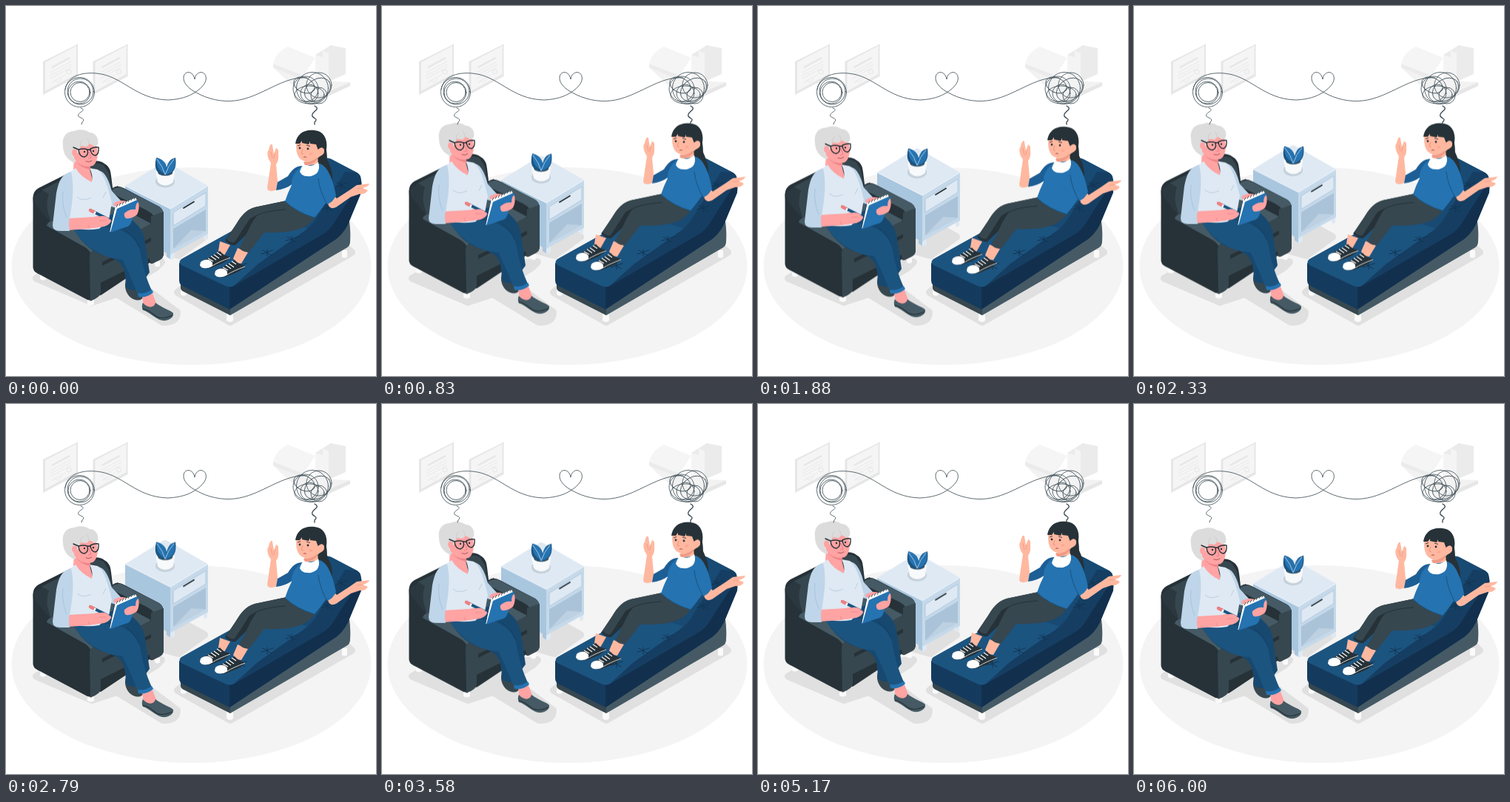
Write an HTML page that moves like this. It is 500 px wide and 500 px high and loops after 6.04 s.

```html
<!DOCTYPE html>
<html lang="en">
<head>
<meta charset="utf-8">
<title>Talking it through</title>
<style>
html, body { margin: 0; width: 100%; height: 100%; overflow: hidden; background: #fff; }
svg { display: block; width: 100vw; height: 100vh; }
@keyframes rise { to { transform: translateY(var(--lift)); } }
.bob, .float { animation: rise 755ms cubic-bezier(.37, 0, .63, 1) infinite alternate; }
.bob { --lift: -9.6px; }
.float { animation-duration: 3020ms; animation-timing-function: linear; }
.desk { --lift: -29px; }
.plant { --lift: -20px; }
.line { fill: none; stroke: #37474f; stroke-linecap: round; stroke-linejoin: round; }
.shade { fill: #e0e0e0; stroke: #e0e0e0; stroke-width: 10; stroke-linejoin: round; }
.ink { fill: #263238; }
.slate { fill: #37474f; }
.steel { fill: #455a64; }
.pale { fill: #dfe9f3; }
.mist { fill: #bfd5e9; }
.blue { fill: #2573b1; }
.navy { fill: #1c5480; }
.deep { fill: #143b5e; }
.rose { fill: #ffa3a3; }
.peach { fill: #ffb8a0; }
.white { fill: #fff; }
.thin { stroke-width: .8; }
</style>
</head>
<body>
<svg viewBox="0 0 500 500">
<defs>
  <g id="diploma">
    <path d="M50 75 94 53 97 51V95L50 120Z" fill="#e6e6e6"/>
    <path d="M53 76 95 54V92L53 115Z" fill="#f5f5f5"/>
    <g fill="none" stroke="#e6e6e6">
      <path d="M62 83 86 70" stroke-width="2.200"/>
      <path d="M60 90 88 75M60 94 88 79M60 98 88 83M64 102 80 93" stroke-width=".8"/>
      <path d="M62 104q4-5 6-2t7-4" stroke-width=".8"/>
      <circle cx="85" cy="89" r="3"/>
    </g>
  </g>
  <path id="tuft" d="M-8 2Q-2 1 0 0Q3-2 8-3M-6-3Q-1-1 0 0Q2 2 6 4M0-4V5" fill="none" stroke="#123452" stroke-width="1" stroke-linecap="round"/>
  <g id="sneaker">
    <path class="ink" d="M289 331C294 337 299 338 303 339 298 347 288 349 277 354 266 356 261 351 263 347 271 341 282 337 289 331Z"/>
    <path class="white" d="M263 346C269 341 276 342 279 347L279 351C272 356 263 355 262 350Z"/>
    <path d="M273 341 280 345M277 338 284 343M281 336 288 341M285 333 291 337" fill="none" stroke="#fff" stroke-width="1.200"/>
    <path d="M264 352Q271 356 279 351T303 340" fill="none" stroke="#fff" stroke-width=".8"/>
  </g>
</defs>

<!-- wall -->
<use href="#diploma"/>
<use href="#diploma" x="67.5"/>
<path d="M361 78 405 100 465 103V108L413 132 361 83Z" fill="#f2f2f2"/>
<path d="M465 103V108L413 132V126Z" fill="#e6e6e6"/>
<path d="M361 78Q365 62 381 55L418 70 402 94Z" fill="#f5f5f5"/>
<path d="M361 78 402 94V100L361 83Z" fill="#ebebeb"/>
<path d="M418 66 439 53 459 57V92L418 110Z" fill="#ebebeb"/>
<path d="M418 66 428 69V109L418 110ZM428 60 436 64V103L428 106Z" fill="#f4f4f4"/>

<!-- floor -->
<ellipse cx="250.500" cy="351.500" rx="243" ry="133.500" fill="#f4f4f4"/>
<path class="shade" d="M41 368 70 353 160 350 210 346 203 353 174 371 231 414Q231 427 212 427L150 389 116 400Z"/>
<path class="shade" d="M190 325 230 291 268 312 233 337Z"/>
<path class="shade" d="M232 387 250 372 450 318 467 333 303 427Z"/>

<!-- cabinet -->
<g class="float desk">
  <path class="pale" d="M267 304H272V315Q269 318 267 315ZM222 330H228V340Q225 344 222 342Z"/>
  <path d="M161 243 222 274V342L217 339V334L161 306Z" fill="#a9c6df"/>
  <path d="M222 274 273 243V308L222 336Z" fill="#c5d9ea"/>
  <path class="pale" d="M161 243 213 211Q215 210 217 211L273 243 222 274Z"/>
  <path d="M161 243 222 274 273 243" fill="none" stroke="#edf3f8"/>
  <path d="M226 279 270 252V270L226 297Z" fill="#dfe9f3" stroke="#a9c3da" stroke-width=".8"/>
  <path d="M240 273 254 264.500" stroke="#263238" stroke-width="1.800" stroke-linecap="round"/>
  <path d="M226 301 270 275V304L226 328Z" fill="#aac3d8"/>
  <path d="M226 328 250 303 270 304Z" fill="#bdd1e2"/>
</g>
<g class="float plant">
  <ellipse cx="215" cy="237" rx="13" ry="8.500" fill="#c3cfda"/>
  <path d="M202.500 225H228L226 238Q215 247 205 238Z" fill="#f7f9fa"/>
  <ellipse cx="215.300" cy="225" rx="12.700" ry="5.500" fill="#fff"/>
  <ellipse cx="215.300" cy="225.500" rx="10" ry="4" fill="#455a64"/>
  <path class="navy" d="M214 229C202 227 200 217 203 205 212 207 218 213 217 222 218 212 221 207 229 205 231 218 227 228 214 229Z"/>
  <path class="blue" d="M214 226C206 223 203 215 203 205 213 207 218 213 216 227ZM216 228C216 216 220 208 228 206 230 216 227 225 216 228Z"/>
  <path d="M204 207Q212 217 215 228Q219 216 227 207" fill="none" stroke="#dfe9f3" stroke-width=".7"/>
</g>

<!-- listener and armchair -->
<g class="bob">
  <path d="M46 360h8v9q-4 3-8 0ZM110 394h9v9q-4 3-9 0ZM201 345h7v6q-3 3-7 0Z" fill="#fafafa"/>
  <path class="ink" d="M36.500 258Q37 250 44 246L112 212Q121 207 130 211L136 215Q141 219 142 229L146 262 150 243 210 275 197 345 128 391 42 361Z"/>
  <path class="slate" d="M48 249 114 215Q123 210 132 215L139 226 147 270 92 300 60 291Z"/>
  <path d="M37 257 49 249 58 254Q52 270 60 291L44 298Z" fill="#2b383f"/>
  <path class="ink" d="M140 254Q140 247 148 244 153 243 159 246L207 271Q213 275 213 283V335Q213 340 208 343L198 348Q193 349 193 342L192 300 142 274Z"/>
  <path class="steel" d="M141 251Q146 244 155 245L207 271Q212 274 213 281L200 284Q196 279 190 276L145 254Z"/>
  <path class="slate" d="M196 284 213 278V335Q213 340 208 343L198 348Q194 347 194 340Z"/>
  <path class="slate" d="M92 300 150 270 196 296V340L128 374Z"/>
  <path class="steel" d="M92 295 147 268 196 294 130 329Z"/>
  <path class="ink" d="M130 346 196 313V318L130 351Z"/>
  <path class="ink" d="M36.500 258 40 268 58 290 120 322Q128 328 128 335V386Q128 391 120 396 115 399 110 397L42 361Q36.500 358 36.500 353Z"/>
  <path class="steel" d="M55 297Q56 290 67 290L122 319Q127 322 128 329L115 335Q111 328 105 325Z"/>
  <path class="slate" d="M113 337Q114 329 128 326V386Q128 391 123 394L114 399Z"/>

  <path class="slate" d="M163 369C158 379 163 392 172 396 180 400 187 396 185 390L177 372Z"/>
  <path d="M101 300 147 280C170 284 183 298 187 313L194 360 176 384Q168 385 162 380C162 350 155 343 132 337 113 331 100 316 92 302Z" fill="#174970"/>
  <path class="rose" d="M184 391 197 386 204 404Q197 411 186 405Z"/>
  <path class="navy" d="M90 299H134C155 299 176 311 181 330 185 354 190 369 198 387Q190 394 179 392C171 372 163 353 157 342 132 343 102 322 90 299Z"/>
  <path d="M178 388Q189 390 197 383L199 387Q190 395 179 393Z" fill="#2573b1"/>
  <path d="M162 304Q174 311 180 326" class="line" style="stroke:#123f63"/>
  <path class="steel" d="M185 401C191 408 200 409 202 401 211 408 222 411 226 415 227 421 220 426 211 425 202 423 193 413 185 411 183 407 184 403 185 401Z"/>
  <path d="M185 409Q193 411 201 418T225 418" fill="none" stroke="#263238" stroke-width="1.200"/>

  <path class="mist" d="M124 222C134 223 139 236 143 250L156 264 149 273 132 268Z"/>
  <path class="rose" d="M145 267Q153 261 163 264L158 276 148 275Z"/>
  <path class="rose" d="M92 203H113V220L118 240 99 231 91 222Z"/>
  <path class="pale" d="M86 225 94 219Q101 231 116 238 118 229 113 219L124 221C133 228 138 245 143 266L139 289 126 301Q103 305 84 297L82 245Z"/>
  <path d="M96 258Q104 265 115 259M135 251l-4 8" fill="none" stroke="#bacfe1"/>
  <path class="rose" d="M84 287 119 285Q126 282 134 285L142 289Q142 295 133 298L112 301 84 303Z"/>
  <path class="mist" d="M88 224C75 227 71 237 68 253L63 296Q63 304 73 304H86Q84 294 86 287C91 260 92 241 88 224Z"/>
  <path d="M77 251Q75 270 82 286" fill="none" stroke="#a4c0d9" stroke-width=".8"/>
  <path d="M114 276 138 288" stroke="#1c5480" stroke-width="4" stroke-linecap="round"/>
  <path d="M114 276 119 278.500" stroke="#ef7f80" stroke-width="4.300" stroke-linecap="round"/>
  <path d="M119 279 121 280" stroke="#fff" stroke-width="4"/>
  <path class="rose" d="M120 287Q130 281 138 286L142 291Q137 297 127 296Z"/>
  <path d="M111 296l2 4M126 290l9 0" stroke="#e9868b" stroke-width=".8"/>
  <path class="white" d="M147 271 175 259 178 264 165 297 140 305Z"/>
  <path class="blue" d="M150 274 177 262Q179 262 178 266L169 293Q167 298 161 299L141 306Z"/>
  <path d="M147 272 140 304" stroke="#174970"/>
  <path d="M149 272l2-4M153 270l2-4M157 268.500l2-4M161 267l2-4M165 265l2-4M169 263l2-4M173 261.500l2-4" stroke="#37474f" stroke-width=".9"/>
  <path class="rose" d="M160 280Q167 274 175 275 175 266 179 265 181 275 177 282 170 288 162 287Q159 284 160 280Z"/>

  <path class="rose" d="M93 188 120 184C126 195 125 211 117 216 106 220 93 213 91 201Z"/>
  <path d="M93 208Q101 218 114 217L114 221Q101 219 93 208Z" fill="#ed858b"/>
  <path d="M92 212C84 208 77 201 77 189 75 177 82 169 92 169 99 166 108 167 113 171 121 171 126 179 124 187L120 190 113 186 109 190 101 189 97 199Q91 194 90 201Q92 207 95 210Z" fill="#dcdcdc"/>
  <path d="M101 190Q99 184 104 181M112 186Q112 181 109 179" fill="none" stroke="#c8c8c8" stroke-width=".7"/>
  <path class="rose" d="M96 195Q90 191 89 198 90 205 96 205Z"/>
  <g class="line" style="stroke:#263238">
    <path d="M91 191 98 194M98 194Q105 192 110 194 112 202 106 204 99 204 98 194ZM114 193Q120 190 125 191 126 200 121 202 115 202 114 193ZM110 195Q112 193 114 195" stroke-width="1.400"/>
    <path d="M108 210Q112 212 116 209" stroke="#a24e59" stroke-width=".9"/>
  </g>
  <circle class="ink" cx="106" cy="197" r="1.200"/>
  <circle class="ink" cx="118" cy="196" r="1.200"/>
  <path d="M112 197 115 205 111 206" fill="none" stroke="#e77c82" stroke-width=".9"/>
</g>

<!-- couch -->
<path d="M236 382h8v8q-4 3-8 0ZM298 415h9v10q-4 4-9 0ZM454 330h7v9q-3 3-7 0Z" fill="#fafafa"/>
<path class="slate" d="M236 370 303 402V418L240 386Q236 384 236 381Z"/>
<path class="steel" d="M303 401 436 305 464 291Q466 306 465 319 465 324 460 327L303 418Z"/>
<path class="deep" d="M234 347 302 379 428 309Q438 303 443 292L478 230Q482 236 480 252L465 288Q459 305 446 315L302 410 238 378Q234 376 234 370Z"/>
<path d="M302 378V410L446 315Q459 305 465 288L480 252 479 232Z" fill="#12304e"/>
<path class="navy" d="M237 342 289 313 380 263Q390 256 397 245L421 211Q430 202 440 207L474 225Q482 230 478 238L444 291Q438 302 428 308L308 378Q303 381 296 378L237 350Q232 346 237 342Z"/>
<path d="M385 293 437 206 474 225Q482 230 478 238L444 291Q438 302 428 308Z" fill="#184a73"/>
<path d="M308 378 340 349 402 305Q413 297 420 286L458 224 474 225Q482 230 478 238L444 291Q438 302 428 308Z" fill="#153e62"/>
<use href="#tuft" x="317" y="351"/>
<use href="#tuft" x="353" y="333"/>
<use href="#tuft" x="386" y="315"/>
<use href="#tuft" x="434" y="273"/>
<use href="#tuft" x="453" y="242"/>

<!-- speaker -->
<g class="bob">
  <path class="ink" d="M418 180C433 181 434 197 434 207 438 216 443 228 440 237 431 233 422 220 419 206Z"/>
  <path class="peach" d="M353 246 358 212C353 206 352 196 355 195 356 188 359 185 360 188L362 200 365 192Q369 193 368 200 369 209 365 214L368 247Q360 252 354 249Z"/>
  <path d="M358 197l2 9M363 199l-1 7" stroke="#ee9a86" stroke-width=".8"/>
  <path d="M401 216C391 216 386 222 381 230L367 238 365 249Q377 248 388 240Z" fill="#1d5e95"/>

  <path class="peach" d="M289 318 303 323 295 337Q290 337 287 331Z"/>
  <path class="ink" d="M379 263 336 272C323 276 318 284 311 295L296 317Q303 324 310 323L335 299 390 283Z"/>
  <path class="peach" d="M313 327 327 333 318 348Q310 348 307 341Z"/>
  <path class="slate" d="M378 264C366 268 346 274 337 286 330 295 325 310 315 327Q321 334 329 332L349 306C373 307 398 305 411 293 418 286 419 282 417 277Z"/>
  <path class="slate" d="M379 263 336 272C323 276 318 284 311 295L298 315Q304 321 309 319L329 288Q343 279 374 276Z"/>
  <path d="M329 290Q341 277 378 275" fill="none" stroke="#263238"/>
  <use href="#sneaker"/>
  <use href="#sneaker" x="20" y="12"/>

  <path class="peach" d="M404 203 421 198 422 220Q413 228 402 221Z"/>
  <path class="blue" d="M399 217 424 213C437 218 441 235 441 254L425 276 417 286Q393 279 377 264 381 252 386 242 385 228 399 217Z"/>
  <path d="M377 264Q393 279 417 286" fill="none" stroke="#1c5480"/>
  <path class="peach" d="M434 262 443 256 447 260 464 249 474 242 491 240Q490 244 482 246L489 249Q486 255 478 254L466 258 446 272Q439 275 436 270Z"/>
  <path class="blue" d="M423 216C436 216 442 237 446 256Q442 265 434 268 422 251 420 235Z"/>
  <path d="M422 233Q424 251 434 268" fill="none" stroke="#1c5480"/>
  <path d="M474 247l8-1" stroke="#ee9a86" stroke-width=".8"/>
  <path class="white" d="M403 213Q411 220 422 211 425 220 420 226 414 231 407 230 400 230 397 224Q399 217 403 213Z"/>
  <path class="peach" d="M393 181 424 182C430 189 430 201 423 204 416 212 405 212 398 207 392 202 391 190 393 181Z"/>
  <path d="M402 211Q413 212 421 204L421 207Q414 216 404 215Z" fill="#ee9a86"/>
  <path class="ink" d="M391 186C393 172 404 166 417 168 430 169 435 181 433 193L432 208Q425 203 422 195L419 187 411 186 411 183 409 187 400 185 400 182 397 186Z"/>
  <path class="peach" d="M421 195Q427 188 430 194 431 202 423 203Z"/>
  <circle class="ink" cx="397" cy="192" r="1.400"/>
  <circle class="ink" cx="408" cy="193" r="1.400"/>
  <path d="M394 189 398 187.500M406 188 411 189.500" stroke="#263238" stroke-width=".9"/>
  <path d="M401 193 399 199 402 200" fill="none" stroke="#e88879" stroke-width=".8"/>
  <path d="M402 204.500Q404 203 406 204.500" fill="none" stroke="#a24e59" stroke-width="1"/>
  <ellipse cx="412" cy="200" rx="2.500" ry="1.800" fill="#ffa793"/>
</g>

<!-- thread -->
<g class="line thin">
  <circle cx="99.500" cy="116.500" r="20"/>
  <circle cx="100.500" cy="115.500" r="17.500"/>
  <circle cx="99" cy="117" r="15"/>
  <circle cx="100" cy="116.500" r="13"/>
  <path d="M80 113C82 96 100 89 122 91 158 94 174 126 219 127 237 126 247 122 255 117 266 110 272 102 270 95 267 86 256 89 255 99 253 87 241 87 240 96 239 105 249 113 257 117 273 126 292 130 309 128 345 124 374 94 407 97"/>
  <path d="M101 138C111 141 95 144 98 149 101 152 108 152 103 157L102 160"/>
</g>
<g class="line thin">
  <circle cx="414" cy="111" r="21.500"/>
  <circle cx="405" cy="112" r="17"/>
  <circle cx="423" cy="107" r="17"/>
  <ellipse cx="410" cy="120" rx="20" ry="12"/>
  <ellipse cx="421" cy="113" rx="19" ry="14" transform="rotate(-35 421 113)"/>
  <ellipse cx="403" cy="107" rx="15" ry="10" transform="rotate(25 403 107)"/>
  <circle cx="410" cy="118" r="12"/>
  <circle cx="423" cy="121" r="11"/>
  <path d="M417 135C427 140 411 143 414 149 417 153 422 152 417 157L417 160" stroke-width="1.300"/>
</g>
</svg>
</body>
</html>
```
